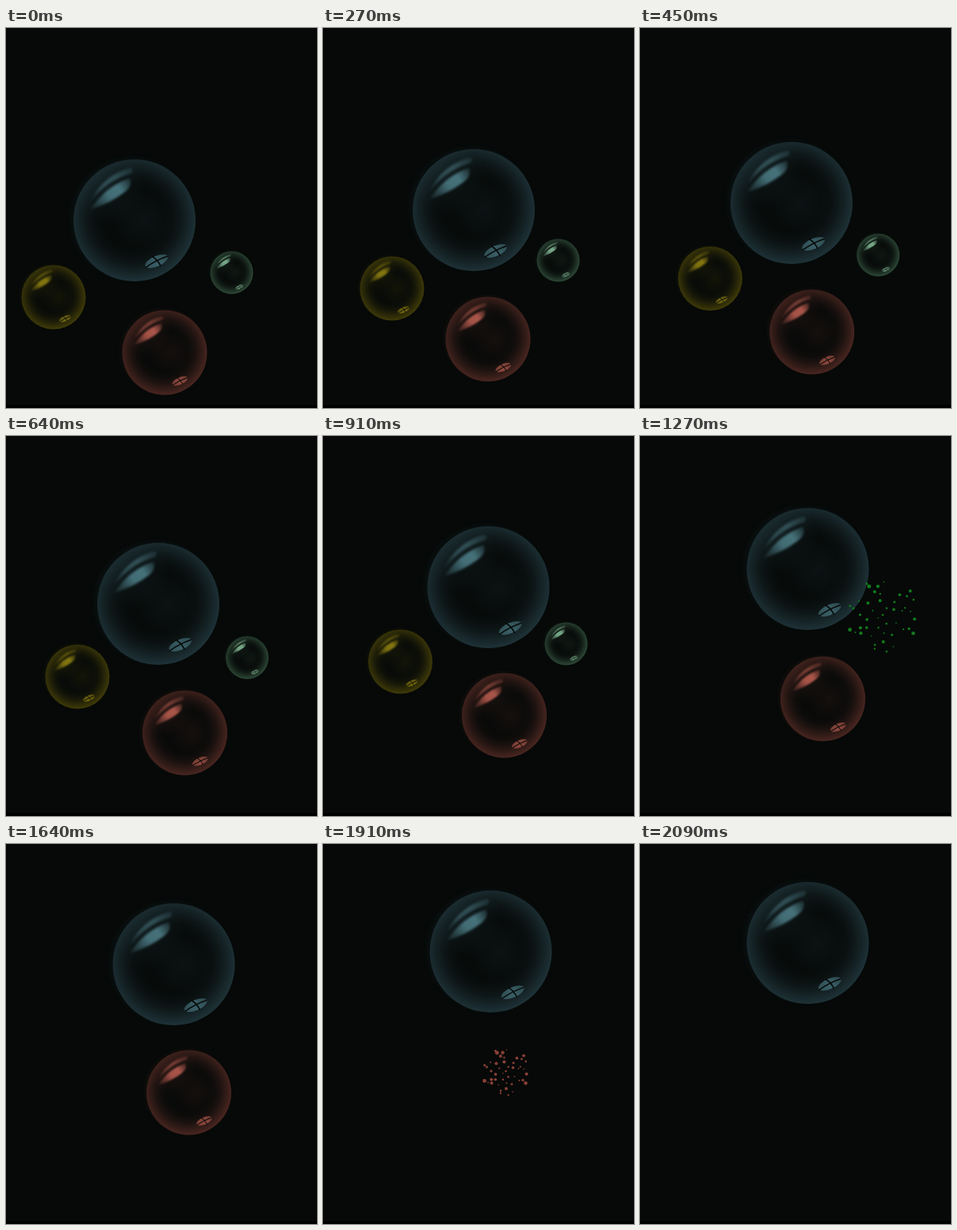
Recreate the animation shown at these times as an HTML page with a canvas. Size 392 by 480 pixels, loop 2.27 s.

```html
<!DOCTYPE html>
<html lang="en">
<head>
<meta charset="utf-8">
<title>Bubbles</title>
<style>
  html, body { margin: 0; width: 100%; height: 100%; overflow: hidden; background: #060908; }
  canvas { display: block; width: 392px; height: 480px; }
</style>
</head>
<body>
<canvas id="stage" width="392" height="480"></canvas>
<script>
const ctx = document.getElementById('stage').getContext('2d');
const BG = '#060908';
const TAU = Math.PI * 2;

// Stepped timeline: 22 poses of 90 ms, a few held longer.
const COUNT = 22;
const HOLD = { 1: 180, 5: 100, 15: 190, 21: 180 };
const starts = [];
let LOOP = 0;
for (let i = 0; i < COUNT; i++) {
  starts.push(LOOP);
  LOOP += HOLD[i] || 90;
}

// Every bubble passes one path point at each of these steps.
const KEYS = [0, 2, 6, 9, 13, 16, 21];
const bubbles = [
  { r: 77, rim: [52, 88, 99], light: [80, 130, 140],
    path: [[162, 243], [190, 230], [192, 212], [208.5, 191], [211.5, 168], [211.5, 152], [211.5, 125]] },
  { r: 40.5, rim: [118, 106, 8], light: [152, 136, 18], popAt: 11,
    path: [[60, 340], [87, 329], [90, 304], [97.5, 285], [98, 262]] },
  { r: 53.5, rim: [136, 64, 54], light: [196, 98, 84], popAt: 19,
    path: [[200, 410], [208, 393], [225.5, 375], [228.5, 353], [230.5, 332], [230.5, 314], [230.5, 287]] },
  { r: 27, rim: [82, 132, 98], light: [136, 192, 156], dust: [19, 122, 28], popAt: 12,
    path: [[284.5, 309], [296.5, 293.5], [304, 280], [306.5, 262.5], [306, 226]] }
];

// Droplets on a jittered sunflower disc: [dx, dy, radius]
let seed = 11;
const rand = () => (seed = (seed * 16807) % 2147483647) / 2147483647;
const drops = Array.from({ length: 46 }, (_, i) => {
  const a = i * 2.4 + rand() * 0.5;
  const d = 47 * Math.sqrt(i / 46);
  return [Math.cos(a) * d, Math.sin(a) * d, 0.8 + 1.7 * rand() ** 1.5];
});

const rgba = (c, a) => `rgba(${c},${a})`;

function pointAt(path, step) {
  let n = 1;
  while (n < path.length - 1 && KEYS[n] < step) n++;
  const k = (step - KEYS[n - 1]) / (KEYS[n] - KEYS[n - 1]);
  return path[n].map((v, axis) => path[n - 1][axis] * (1 - k) + v * k);
}

function shade(g, color, ...alphas) {
  alphas.forEach((a, i) => g.addColorStop(i / (alphas.length - 1), rgba(color, a)));
  return g;
}

function disc(x, y, r) {
  ctx.beginPath();
  ctx.arc(x, y, r, 0, TAU);
}

function drawWindow(light) {
  ctx.save();
  ctx.translate(0.36, 0.67);
  ctx.rotate(-0.42);
  ctx.fillStyle = shade(ctx.createLinearGradient(-0.2, 0, 0.2, 0), light, 0.5, 0.65, 0.45);
  ctx.beginPath();
  ctx.ellipse(0, 0, 0.2, 0.085, 0, 0, TAU);
  ctx.fill();
  ctx.strokeStyle = BG;
  ctx.lineWidth = 0.02;
  ctx.beginPath();
  ctx.moveTo(-0.2, 0.02);
  ctx.quadraticCurveTo(0, -0.02, 0.2, 0);
  ctx.moveTo(-0.03, -0.1);
  ctx.quadraticCurveTo(0.03, 0, 0.03, 0.1);
  ctx.stroke();
  ctx.restore();
}

function drawHighlight(light) {
  // broad lower patch
  ctx.fillStyle = shade(ctx.createLinearGradient(-0.74, -0.16, -0.08, -0.64), light, 0.08, 0.4, 0.8, 0.85, 0.3);
  ctx.beginPath();
  ctx.moveTo(-0.72, -0.18);
  ctx.quadraticCurveTo(-0.47, -0.56, -0.08, -0.69);
  ctx.quadraticCurveTo(-0.02, -0.56, -0.18, -0.45);
  ctx.quadraticCurveTo(-0.4, -0.28, -0.72, -0.18);
  ctx.fill();
  // thin upper band
  ctx.fillStyle = shade(ctx.createLinearGradient(-0.74, -0.3, -0.08, -0.82), light, 0.12, 0.45, 0.5, 0.25);
  ctx.beginPath();
  ctx.moveTo(-0.73, -0.3);
  ctx.quadraticCurveTo(-0.5, -0.76, -0.06, -0.86);
  ctx.quadraticCurveTo(0, -0.82, -0.06, -0.77);
  ctx.quadraticCurveTo(-0.47, -0.65, -0.73, -0.3);
  ctx.fill();
}

function drawBubble({ r, rim, light }, x, y) {
  ctx.save();
  ctx.translate(x, y);
  ctx.scale(r, r);

  // faint halo to the upper left
  ctx.filter = `blur(${r * 0.03}px)`;
  ctx.fillStyle = rgba(rim, 0.06);
  disc(-0.05, -0.03, 1.02);
  ctx.fill();
  ctx.filter = 'none';

  ctx.fillStyle = BG;
  disc(0, 0, 1);
  ctx.fill();
  ctx.fillStyle = shade(ctx.createRadialGradient(0.15, 0, 0, 0.15, 0, 0.5), rim, 0.1, 0.05, 0);
  ctx.fill();
  ctx.fillStyle = shade(ctx.createRadialGradient(-0.02, -0.04, 0.5, -0.02, -0.04, 1.04), rim, 0.02, 0.07, 0.18, 0.34, 0.52);
  ctx.fill();
  ctx.fillStyle = shade(ctx.createRadialGradient(-0.42, -0.52, 0, -0.42, -0.52, 0.6), rim, 0.2, 0.08, 0);
  ctx.fill();

  ctx.filter = `blur(${r * 0.022}px)`;
  drawHighlight(light);
  ctx.filter = `blur(${r * 0.006}px)`;
  drawWindow(light);
  ctx.restore();
}

function drawBurst(b, x, y, size) {
  ctx.fillStyle = rgba(b.dust || b.rim, 1);
  for (const [dx, dy, r] of drops) {
    disc(x + dx * size, y + dy * size, r);
    ctx.fill();
  }
}

function draw(step) {
  ctx.fillStyle = BG;
  ctx.fillRect(0, 0, 392, 480);
  for (const b of bubbles) {
    const age = step - (b.popAt ?? COUNT);
    if (age < 0) drawBubble(b, ...pointAt(b.path, step));
    else if (age < 2) drawBurst(b, ...b.path.at(-1), 0.65 + 0.35 * age);
  }
  ctx.fillStyle = '#000';
  ctx.fillRect(0, 476, 392, 4);
}

const begin = performance.now();
let shown = -1;
function tick() {
  const t = (performance.now() - begin) % LOOP;
  let step = COUNT - 1;
  while (starts[step] > t) step--;
  if (step !== shown) draw(shown = step);
  requestAnimationFrame(tick);
}
tick();
</script>
</body>
</html>
```
